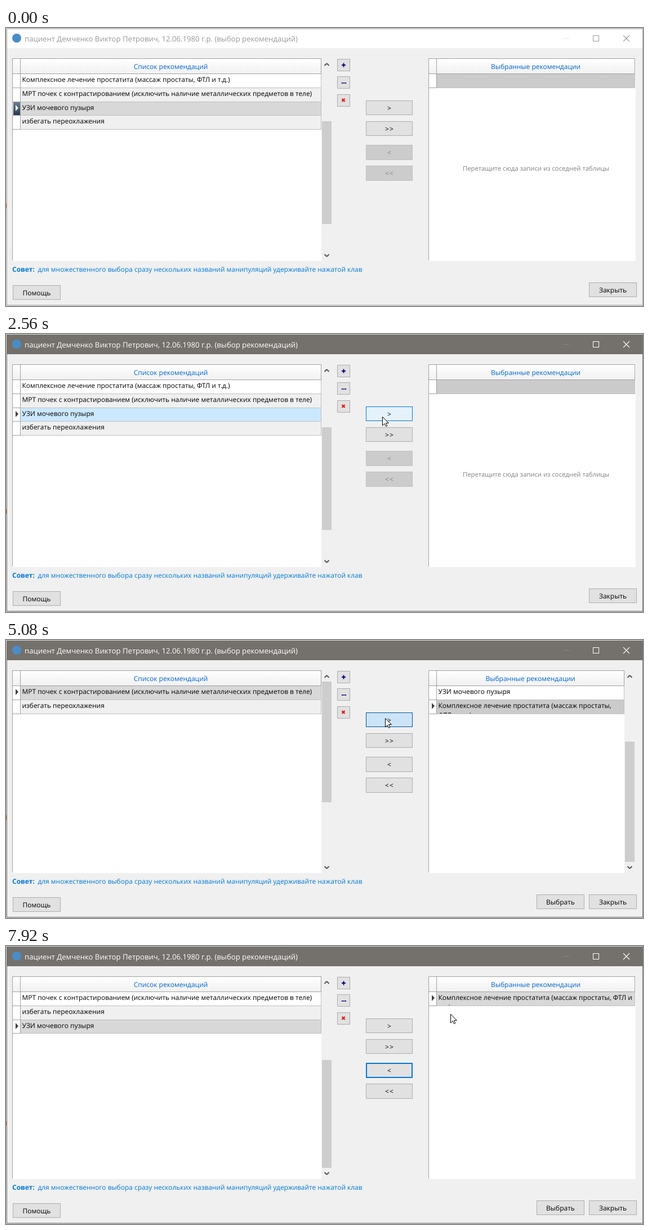
An HTML page with a canvas for the animation above (8000 ms loop, 1131 px wide and 495 px high).

```html
<!DOCTYPE html>
<html lang="ru">
<head>
<meta charset="utf-8">
<style>
html, body { margin: 0; width: 100%; height: 100%; overflow: hidden; background: #f0f0f0; }
canvas { display: block; }
</style>
</head>
<body>
<canvas id="stage" width="1131" height="495"></canvas>
<script>
const g = document.getElementById('stage').getContext('2d');
const LOOP = 8000;
const BLUE = '#0078d7', LINK = '#0066cc';
const FONT = '"Open Sans", "Noto Sans", sans-serif';
const PITCH = 24.75;

const items = [
  'Комплексное лечение простатита (массаж простаты, ФТЛ и т.д.)',
  'МРТ почек с контрастированием (исключить наличие металлических предметов в теле)',
  'УЗИ мочевого пузыря',
  'избегать переохлажения'
];
const rowColor = { idle: '#d8d8d8', focus: '#cce8ff', old: '#cbcbcb' };

// Each step changes part of the window state at its time.
const steps = [
  [0, { active: false, hot: true, focus: -1, press: -1,
        left: [0, 1, 2, 3], leftSel: 2, leftColor: 'idle', leftThumb: [166, 183],
        right: [], rightSel: 0, rightColor: 'idle', rightThumb: null }],
  [480, { active: true, leftColor: 'focus' }],
  [1720, { hot: false }],
  [2800, { press: 0, focus: 0, leftColor: 'idle' }],
  [2920, { press: -1, left: [0, 1, 3], leftThumb: [139, 192], right: [2] }],
  [4200, { focus: -1, leftSel: 0, leftColor: 'focus', leftThumb: [74, 192] }],
  [4920, { press: 0, focus: 0, leftColor: 'idle' }],
  [5060, { left: [1, 3], leftThumb: [74, 215], right: [2, 0], rightSel: 1,
           rightColor: 'old', rightThumb: [181, 214] }],
  [5120, { press: -1 }],
  [6160, { focus: -1, rightThumb: [74, 215] }],
  [6280, { rightSel: 0, rightColor: 'focus' }],
  [7280, { press: 2, focus: 2, rightColor: 'idle' }],
  [7400, { press: -1, left: [1, 3, 2], leftSel: 2, leftThumb: [203, 192],
           right: [0], rightThumb: null }]
];

// Pointer moves: start, end, control point, end point.
const moves = [
  [80, 480, 360, -5, 340, 20],
  [520, 1280, 330, 60, 314, 137],
  [1280, 1440, 313, 137, 312, 136],
  [1760, 2480, 480, 30, 669, 147],
  [2960, 3560, 520, 70, 386, 134],
  [3560, 3720, 382, 136, 378, 134],
  [3720, 4000, 380, 115, 377, 102],
  [4280, 4880, 520, 80, 674, 139],
  [5120, 5840, 780, 120, 862, 100],
  [5920, 6160, 850, 88, 844, 92],
  [6440, 7120, 770, 190, 675, 220],
  [7400, 7880, 730, 165, 790, 121]
];
const clicks = [480, 1720, 2800, 4200, 4920, 6160, 7280];

const transfer = [['>', 129, 26], ['>\u200a>', 166, 26], ['<', 208, 27], ['<\u200a<', 245, 27]];

function rect(x, y, w, h, color) {
  g.fillStyle = color;
  g.fillRect(x, y, w, h);
}

function frame(x, y, w, h, fill, edge, line = 1) {
  rect(x, y, w, h, edge);
  rect(x + line, y + line, w - 2 * line, h - 2 * line, fill);
}

function text(str, x, y, color = '#000', size = 11.93, align = 'left', weight = 400) {
  g.font = `${weight} ${size}px ${FONT}`;
  g.textRendering = 'geometricPrecision';
  g.textAlign = align;
  g.fillStyle = color;
  g.fillText(str, x, y);
}

function lines(points, color, width = 1) {
  g.beginPath();
  points.forEach(([x, y], i) => i % 2 ? g.lineTo(x, y) : g.moveTo(x, y));
  g.strokeStyle = color;
  g.lineWidth = width;
  g.stroke();
}

function shape(points, fill) {
  g.beginPath();
  points.forEach(([x, y]) => g.lineTo(x, y));
  g.closePath();
  g.fillStyle = fill;
  g.fill();
}

function disc(x, y, r, color) {
  g.beginPath();
  g.arc(x, y, r, 0, 7);
  g.fillStyle = color;
  g.fill();
}

function shade(y0, y1, a, b) {
  const s = g.createLinearGradient(0, y0, 0, y1);
  s.addColorStop(0, a);
  s.addColorStop(1, b);
  return s;
}

function button(label, x, y, w, h, fill = '#e1e1e1', edge = '#adadad', ink = '#000', line = 1) {
  frame(x, y, w, h, fill, edge, line);
  text(label, x + w / 2, y + h / 2 + 4.5, ink, 12, 'center');
}

function scrollbar(x, [top, size]) {
  rect(x, 55, 19, 359, '#f0f0f0');
  rect(x + 1, top, 17, size, '#cdcdcd');
  for (const [y, d] of [[67, -4], [403, 4]]) {
    const a = [x + 5.5, y], b = [x + 9.5, y + d], c = [x + 13.5, y];
    lines([a, b, b, c], '#505050', 1.8);
  }
}

function grid(x, end, title, rows, sel, color, hot) {
  const col = x + 14;
  rect(x, 54, end - x, 361, '#fff');
  rect(x, 54, end - x, 1, '#a0a0a0');
  rect(x, 54, 1, 360, '#a0a0a0');
  rect(x + 1, 55, end - x - 1, 26, shade(55, 81, '#fff', '#f1f1f1'));
  rect(x, 81, end - x, 1, '#a0a0a0');
  rect(col, 55, 1, 26, '#a0a0a0');
  rect(end - 1, 55, 1, 26, '#a0a0a0');
  text(title, (col + end) / 2, 73, LINK, 12, 'center');

  rows.forEach((item, i) => {
    const y = Math.round(82 + PITCH * i), line = Math.round(81 + PITCH * (i + 1));
    const h = line - y, base = 96 + PITCH * i, on = i === sel;
    rect(col, y, end - col, h, on ? color : i % 2 ? '#f0f0f0' : '#fff');
    rect(col, line, end - col, 1, '#c0c0c0');
    rect(x, line, 15, 1, '#a0a0a0');
    rect(col, y, 1, h, '#a0a0a0');
    rect(end - 1, y, 1, h, '#c0c0c0');
    if (on && hot) rect(x + 2, y, 12, h, shade(y, line, '#6c7f95', '#27384d'));
    if (on && item >= 0) {
      shape([[x + 6, y + 5], [x + 11, y + 10.5], [x + 6, y + 16]], hot ? '#fff' : '#404040');
    }
    if (item < 0) return;

    const str = items[item];
    let cut = str.length;
    if (item === 0 && x > 700) cut = end > 1100 ? str.lastIndexOf(' ') : str.indexOf(' ФТЛ');
    g.save();
    g.beginPath();
    g.rect(col, y, end - col, h);
    g.clip();
    text(str.slice(0, cut), col + 3.5, base);
    text(str.slice(cut + 1), col + 3.5, base + 17);
    g.restore();
  });
}

function titleBar(active) {
  const ink = active ? '#fff' : '#999';
  rect(2, 2, 1128, 34, active ? '#74706c' : '#fff');
  disc(19, 18, 8, '#4a8cc8');
  text('пациент Демченко Виктор Петрович, 12.06.1980 г.р. (выбор рекомендаций)', 33, 24, ink, 13.15);
  rect(989, 18, 11, 1, active ? '#8b8783' : '#e6e6e6');
  g.strokeStyle = ink;
  g.lineWidth = 1;
  g.strokeRect(1042.5, 13.5, 10, 10);
  lines([[1096, 13], [1107, 24], [1107, 13], [1096, 24]], ink, 1.1);
}

function tools() {
  for (const y of [55, 86, 118]) frame(588, y, 23, 22, '#e1e1e1', '#adadad');
  rect(596, 65, 7, 2, '#000080');
  rect(598.5, 62.5, 2, 7, '#000080');
  for (const x of [596, 599, 602]) rect(x, 97, 2, 2, '#000080');
  lines([[596.5, 126], [601.5, 131], [601.5, 126], [596.5, 131]], '#f00000', 2);
}

function transferButtons(s, p) {
  transfer.forEach(([label, y, h], i) => {
    const over = p.x >= 639 && p.x < 722 && p.y >= y && p.y < y + h;
    let look = [];
    if (i > 1 && !s.right.length) look = ['#cccccc', '#bfbfbf', '#838383'];
    else if (s.press === i) look = ['#cce4f7', '#005499'];
    else if (over) look = ['#e5f1fb', BLUE];
    else if (s.focus === i) look = ['#e1e1e1', BLUE, '#000', 2];
    button(label, 639, y, 83, h, ...look);
  });
}

function pointerAt(t) {
  let x = 365, y = -30;
  for (const [t0, t1, cx, cy, ex, ey] of moves) {
    if (t < t0) break;
    const u = Math.min(1, (t - t0) / (t1 - t0));
    const e = u * u * (3 - 2 * u), r = 1 - e;
    x = r * r * x + 2 * r * e * cx + e * e * ex;
    y = r * r * y + 2 * r * e * cy + e * e * ey;
  }
  return { x, y };
}

function pointer({ x, y }, t) {
  if (clicks.some(c => t >= c && t < c + 120)) disc(x, y, 13, 'rgba(255,232,0,.62)');
  g.save();
  g.translate(Math.round(x) - .5, Math.round(y) + .5);
  shape([[0, 0], [0, 15.5], [3.6, 12], [6, 17], [8.3, 16], [6, 11], [10.8, 11]], '#fff');
  g.strokeStyle = '#000';
  g.lineWidth = 1;
  g.stroke();
  g.restore();
}

function draw(t) {
  const s = Object.assign({}, ...steps.filter(([at]) => at <= t).map(step => step[1]));
  const p = pointerAt(t);

  rect(0, 0, 1131, 495, '#dcdcdc');
  rect(0, 312, 2, 8, '#c87830');
  frame(1, 1, 1130, 493, '#f0f0f0', s.active ? '#74706c' : '#a6a6a6');
  titleBar(s.active);

  grid(11, 560, 'Список рекомендаций', s.left, s.leftSel, rowColor[s.leftColor], s.hot);
  scrollbar(560, s.leftThumb);
  tools();
  transferButtons(s, p);

  const empty = !s.right.length;
  grid(750, s.rightThumb ? 1098 : 1117, 'Выбранные рекомендации', empty ? [-1] : s.right,
    s.rightSel, empty ? rowColor.old : rowColor[s.rightColor], false);
  if (s.rightThumb) scrollbar(1098, s.rightThumb);
  else rect(1117, 55, 1, 359, '#fff');
  if (empty) text('Перетащите сюда записи из соседней таблицы', 941, 253.5, '#808080', 11.3, 'center');

  text('Совет:', 11, 433.5, BLUE, 12, 'left', 700);
  text('для множественного выбора сразу нескольких названий манипуляций удерживайте нажатой клав',
    56.5, 433.5, BLUE);
  button('Помощь', 12, 458, 85, 26);
  if (!empty) button('Выбрать', 942, 453, 85, 26);
  button('Закрыть', 1035, 453, 85, 26);
  pointer(p, t);
}

const start = performance.now();
function tick() {
  draw((performance.now() - start) % LOOP);
  requestAnimationFrame(tick);
}
tick();
</script>
</body>
</html>
```
